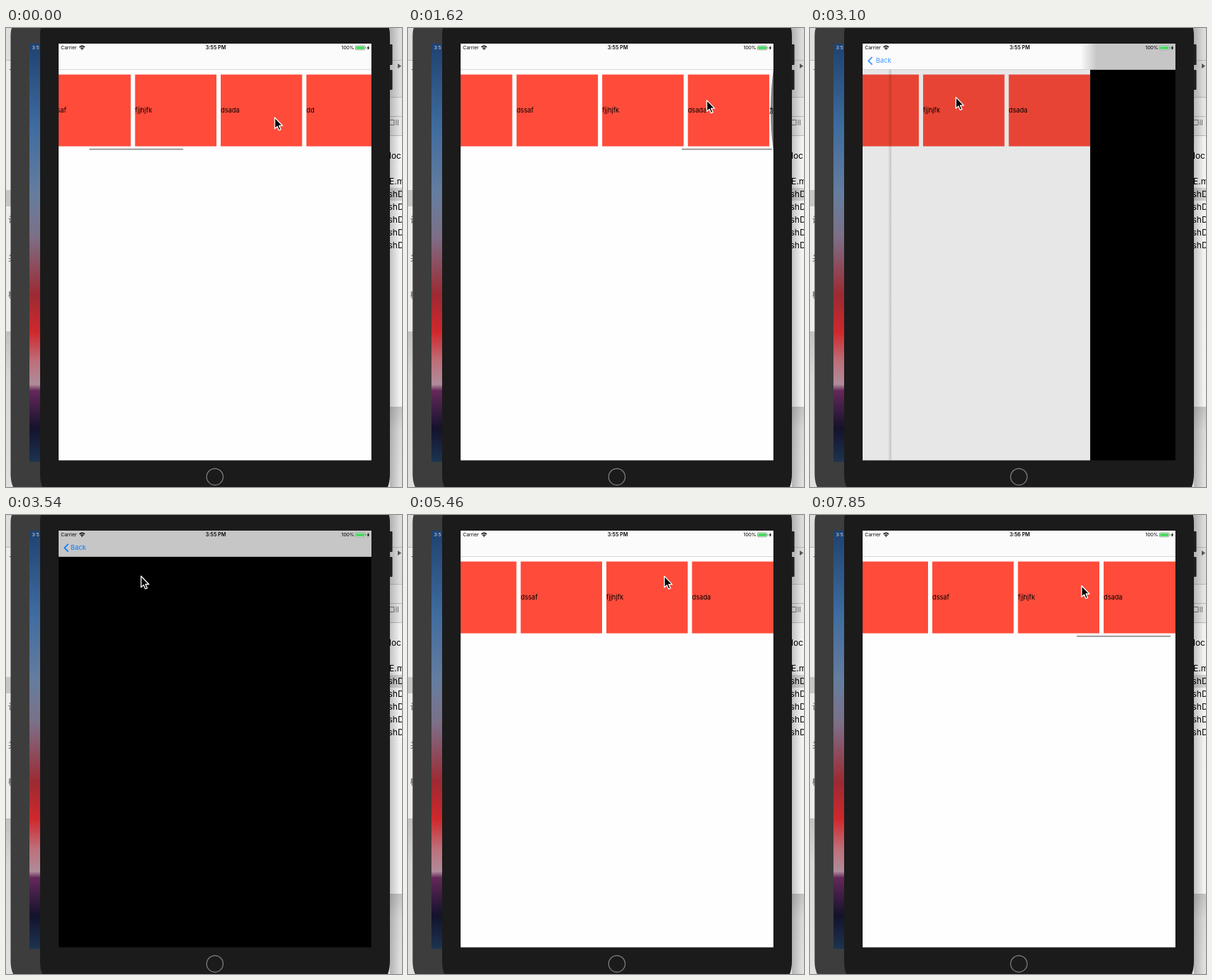
These frames come from a looping animation (557x646 px, 8000 ms). An HTML page:

```html
<!DOCTYPE html>
<html lang="zh-CN">
<head>
<meta charset="utf-8">
<title>Pull to load more</title>
<style>
  html, body { margin: 0; width: 100%; height: 100%; overflow: hidden; background: #d9d9d9; }
  svg { display: block; width: 557px; height: 646px; }
  text { font-family: Inter, "Noto Sans CJK SC", "Noto Sans CJK", sans-serif; }
  .card { fill: #ff4b3a; }
  .label, #back text { font-size: 9.2px; }
  #more { font-size: 10px; }
  .status { font-size: 6.8px; }
  #files { font-size: 12px; }
  #side { font-size: 11px; fill: #555; }
</style>
</head>
<body>
<svg viewBox="0 0 557 646">
  <defs>
    <linearGradient id="wall" x2="0" y2="1">
      <stop offset="0" stop-color="#1f4270"/>
      <stop offset=".2" stop-color="#3f6c9f"/>
      <stop offset=".36" stop-color="#667d9f"/>
      <stop offset=".46" stop-color="#7c7088"/>
      <stop offset=".6" stop-color="#9c2a33"/>
      <stop offset=".69" stop-color="#cf282c"/>
      <stop offset=".76" stop-color="#bd6f7a"/>
      <stop offset=".815" stop-color="#b08c9a"/>
      <stop offset=".83" stop-color="#64285a"/>
      <stop offset=".92" stop-color="#14122c"/>
      <stop offset="1" stop-color="#1c3450"/>
    </linearGradient>
    <linearGradient id="cast">
      <stop offset="0" stop-opacity=".2"/>
      <stop offset="1" stop-opacity="0"/>
    </linearGradient>
    <linearGradient id="edgeCast">
      <stop offset="0" stop-opacity="0"/>
      <stop offset="1" stop-opacity=".16"/>
    </linearGradient>
    <linearGradient id="below" x2="0" y2="1">
      <stop offset="0" stop-color="#c2c2c2"/>
      <stop offset=".3" stop-color="#d8d8d8"/>
      <stop offset="1" stop-color="#e0e0e0"/>
    </linearGradient>
    <linearGradient id="navFill" gradientUnits="userSpaceOnUse" y1="0" y2="0">
      <stop offset="0" stop-color="#fbfbfb"/>
      <stop offset="1" stop-color="#c6c6c6"/>
    </linearGradient>
    <clipPath id="page"><rect x="74" y="58" width="440" height="550.4"/></clipPath>
  </defs>

  <!-- desktop, left edge -->
  <rect width="9" height="646" fill="#ececec"/>
  <rect width="9" height="45" fill="#dedede"/>
  <rect y="45" width="9" height="1" fill="#b9b9b9"/>
  <rect y="228" width="9" height="23" fill="#c6c6c6"/>
  <rect y="427" width="12" height="219" fill="url(#below)"/>
  <g id="side">
    <text x="4" y="62">-</text><text x="3" y="274">计</text>
    <text x="3" y="328">关</text><text x="3" y="380">模</text>
  </g>

  <!-- desktop, right edge -->
  <rect x="538" width="19" height="152" fill="#dcdcdc"/>
  <rect x="538" y="97" width="19" height="55" fill="#e6e6e6"/>
  <path d="M538 45.500h19m-19 52h19m-19 27h19m-19 27h19" stroke="#bababa"/>
  <path d="M551 50l5 3.500-5 3.500z" fill="#555"/>
  <path d="M538 129.500h8v7h-8M549 129v8M551.500 129v8" fill="none" stroke="#777"/>
  <rect x="538" y="152" width="19" height="381" fill="#f3f3f3"/>
  <rect x="538" y="225" width="19" height="18" fill="#d0d0d0"/>
  <rect x="538" y="533" width="19" height="113" fill="url(#below)"/>
  <g id="files">
    <text x="539" y="184">loc</text><text x="539" y="220">E.m</text>
  </g>
  <rect x="540" width="14" height="646" fill="url(#cast)"/>

  <!-- rear tablet -->
  <path d="M8 0Q6.500 4 6.500 12V628Q6.500 638 10 646H60V0z" fill="#3d3d3d"/>
  <rect x="33" y="22" width="20" height="588.5" fill="url(#wall)"/>
  <text class="status" x="36.500" y="30.300" fill="#d5dfea">3:5</text>

  <!-- front tablet -->
  <path d="M49 0Q48 4 48 12V628Q48 638 51 646H537Q540 638 540 628V12Q540 4 539 0z" fill="#1b1b1b"/>
  <path d="M539 23h3.500q1 0 1 1v27q0 1-1 1H539zm0 36h3.500q1 0 1 1v26q0 1-1 1H539z" fill="#1f1f1f"/>
  <circle cx="293.800" cy="631.700" r="11.600" fill="none" stroke="#858585" stroke-width="1.200"/>
  <rect x="74" y="22" width="440" height="586.400"/>

  <g clip-path="url(#page)">
    <g id="under">
      <rect x="74" y="58" width="440" height="551" fill="#fefefe"/>
      <g clip-path="url(#page)">
        <g id="cards"></g>
        <path id="bulge" fill="#808080"/>
        <text id="more" y="119.500">加载更多</text>
        <rect id="bar" y="169.700" height="1.700" rx=".8" fill="#8c8c8c"/>
      </g>
      <rect id="dim" x="74" y="58" width="440" height="551"/>
    </g>
    <rect id="edge" y="58" width="5" height="551" fill="url(#edgeCast)"/>
  </g>

  <!-- navigation and status bar -->
  <rect x="74" y="22" width="440" height="36" fill="url(#navFill)"/>
  <rect x="74" y="58" width="440" height=".8" fill="#cfcfd2"/>
  <g id="back">
    <path d="M87.500 40.800L82.200 46.200L87.500 51.600" fill="none" stroke="#0a7aff" stroke-width="1.700"/>
    <text id="backText" y="49.400" fill="#0a7aff">Back</text>
  </g>
  <g class="status">
    <text x="77.300" y="30.400">Carrier</text>
    <text id="clock" x="295" y="30.400" text-anchor="middle" font-weight="600" font-size="7.100"></text>
    <text x="489.700" y="30.400" text-anchor="end">100%</text>
  </g>
  <path d="M103.300 27Q107 23.500 110.800 27M104.900 28.700Q107 26.900 109.200 28.700"
        fill="none" stroke="#000" stroke-width="1.300"/>
  <path d="M105.700 29.700Q107 28.700 108.400 29.700L107 31.100z"/>
  <rect x="491.500" y="24.900" width="13.400" height="6" rx="1.200" fill="#fff" stroke="#777" stroke-width=".6"/>
  <rect x="492.300" y="25.700" width="11.800" height="4.400" rx=".6" fill="#4cd964"/>
  <rect x="505.500" y="26.900" width="1" height="2" fill="#777"/>
  <path d="M510.400 24.600L507.600 28.400H509.200L508.600 31.200L511.400 27.400H509.700z"/>

  <path id="cursor" d="M0 0V15.800L3.600 12.500L6 18L8.600 16.900L6.200 11.500H11z"
        stroke="#fff" stroke-width="1.300" stroke-linejoin="round"/>
</svg>

<script>
const LOOP = 8000, STEP = 147.4, LAST_STEP = 53;
const RIGHT = 514, WIDTH = 440, CARD = 114.5, PITCH = 120.5, COUNT = 12;
const REST = RIGHT - CARD;   // last card's x when scrolled to the end
const LABELS = ["dd", "dssaf", "fjjhjfk", "dsada"];

const $ = id => document.getElementById(id);
const set = (id, attrs) => {
  for (const key in attrs) $(id).setAttribute(key, attrs[key]);
};
const ramp = (t, from, to) => Math.min(1, Math.max(0, (t - from) / (to - from)));
const smooth = (t, from, to) => {
  const u = ramp(t, from, to);
  return u * u * (3 - 2 * u);
};
const fall = (t, from, to) => (1 - ramp(t, from, to)) ** 2;

// Rubber band: how far the list follows a drag past its end.
const stretch = drag => WIDTH * (1 - 1 / (1 + drag * .55 / WIDTH));

const overscroll = t =>
  stretch(206 * ramp(t, 1573, 2500)) * fall(t, 2640, 3100) +
  stretch(222 * ramp(t, 5750, 6485)) * fall(t, 6640, 7370);

const scrolled = t => 866.5 * fall(t, 0, 1300) + 13.5 * ramp(t, 7500, 7810);

// 1 = list in place, 0 = list pushed away
const presence = t => 1 - smooth(t, 2640, 3200) + smooth(t, 4310, 5000);

// Pointer stops: time, x, y
const stops = [
  [0, 378, 126], [350, 250, 123], [1573, 431, 101], [2500, 226, 113], [3530, 190, 86],
  [3840, 190, 86], [4260, 97, 52], [4600, 97, 52], [5750, 452, 98], [6485, 230, 96],
  [6640, 230, 96], [7370, 382, 99.5]];

function pointer(t) {
  const i = stops.findIndex(stop => stop[0] > t);
  if (i < 0) return stops.at(-1).slice(1);
  const [t0, x0, y0] = stops[i - 1], [t1, x1, y1] = stops[i];
  const u = ramp(t, t0, t1);
  return [x0 + (x1 - x0) * u, y0 + (y1 - y0) * u];
}

function build() {
  for (let i = 0; i < COUNT; i++) {
    const x = (i - COUNT + 1) * PITCH;
    $("cards").innerHTML += `<rect class="card" x="${x}" y="65.500" width="${CARD}" height="101"/>
      <text class="label" x="${x}" y="119.300">${LABELS[i % LABELS.length]}</text>`;
  }
  for (let i = 0; i < 5; i++) {
    $("files").innerHTML += `<text x="537.500" y="${238 + 18 * i}">shD</text>`;
  }
}

function drawList(t) {
  const over = overscroll(t), offset = scrolled(t), x = REST + offset - over;
  set("cards", { transform: `translate(${x})` });
  set("bulge", { d: `M514 58.500Q${RIGHT - over * 4 / 3} 116 514 173z` });
  set("more", { x: Math.max(474, x + CARD) });
  const left = 379 + over - offset * .3024;
  const opacity = 1 - ramp(t, 2650, 2945) + ramp(t, 5700, 5850);
  set("bar", { x: left, width: Math.min(132.5, 512 - left), opacity });
}

function drawPages(t) {
  const p = presence(t), shift = -.3 * WIDTH * (1 - p);
  const gone = p === 0, moving = p > 0 && p < 1;
  const seam = gone ? 0 : moving ? RIGHT + shift : 600;
  set("under", { transform: `translate(${shift})`, visibility: gone ? "hidden" : "visible" });
  set("dim", { opacity: .1 * (1 - p) });
  set("edge", { x: 69 + WIDTH * p, opacity: moving ? 1 : 0 });
  set("navFill", { x1: seam - 13, x2: seam + 9 });
  set("back", { opacity: Math.max(0, 1 - 2.3 * p) });
  set("backText", { x: 91 + 20 * p });
}

function draw(now) {
  // The picture is held for one step; the slack absorbs rounding.
  const t = Math.min(LAST_STEP, Math.floor((now % LOOP + 8) / STEP)) * STEP;
  drawList(t);
  drawPages(t);
  $("clock").textContent = t < 7500 ? "3:55 PM" : "3:56 PM";
  set("cursor", { transform: `translate(${pointer(t)})` });
}

function tick() {
  draw(performance.now());
  requestAnimationFrame(tick);
}

build();
draw(0);
requestAnimationFrame(tick);
</script>
</body>
</html>
```
